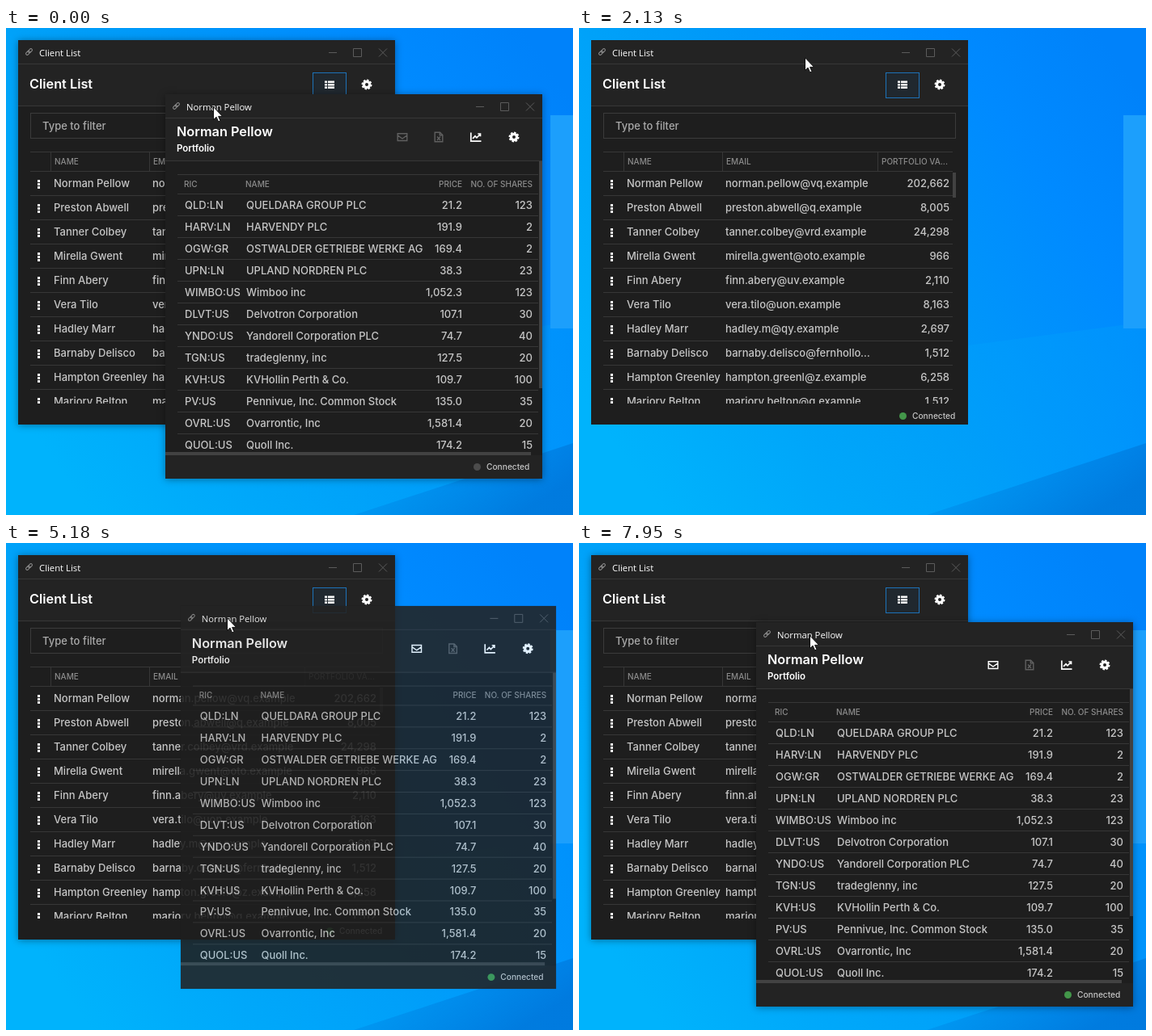
Animation of 701x603 px, one loop 8.48 s. Source, as an HTML page:

```html
<!DOCTYPE html>
<html lang="en">
<head>
<meta charset="utf-8">
<title>Window tabbing</title>
<style>
html, body { margin: 0; width: 100%; height: 100%; overflow: hidden; background: #009cf8; }
#stage { position: relative; width: 701px; height: 603px; overflow: hidden; font: 500 13px Inter, sans-serif; color: #c6c6c6; white-space: nowrap; }
#stage * { box-sizing: border-box; }
#stage > *, .abs { position: absolute; }
.window { left: 0; top: 0; width: 466px; height: 476px; background: #1e1e1e; overflow: hidden; }
.shadow { box-shadow: 0 1px 9px rgba(0, 0, 0, .38); }
.bar, .header { left: 0; width: 466px; background: #232323; border-bottom: 1px solid #373737; }
.bar { top: 0; height: 30px; }
.header { top: 30px; }
.caption { font: 400 11.3px/20px "Open Sans", sans-serif; color: #fff; }
.heading { font-size: 16.3px; font-weight: 600; line-height: 20px; color: #fff; }
.small { font-size: 11.5px; font-weight: 600; line-height: 14px; color: #fff; }
.head { left: 15px; height: 25px; border: solid #373737; border-width: 1px 0; font-size: 10px; line-height: 23px; color: #8c8c8c; }
.rows { left: 15px; overflow: hidden; }
.row { position: relative; border-bottom: 1px solid #373737; }
.icon { width: 16px; height: 16px; overflow: visible; color: #fff; }
.dim { color: #606060; }
.link { color: #929292; }
.status { font-size: 10.2px; line-height: 14px; }
.dot { width: 9px; height: 9px; border-radius: 50%; background: #43974a; }
.line { background: #373737; }
.thumb { background: #424242; }
.tabs { display: none; left: 0; top: 0; width: 466px; height: 30px; }
.tabbed .tabs { display: block; }
.tabbed .plain { display: none; }
.tab { top: 0; width: 160px; height: 30px; border-right: 1px solid #383838; }
.tab.active { background: #262626; border-bottom: 3px solid #1784d8; }
.tab .caption { color: #858585; }
.tab.active .caption { color: #fff; font-weight: 600; }
#cursor { left: -1px; top: -1px; }
</style>
</head>
<body>
<div id="stage">
  <svg width="701" height="603">
    <defs>
      <linearGradient id="sky" x1="0" y1=".75" x2="1" y2=".15">
        <stop offset="0" stop-color="#00b3fc"/><stop offset=".45" stop-color="#009cf8"/>
        <stop offset=".8" stop-color="#008aff"/><stop offset="1" stop-color="#0082fa"/>
      </linearGradient>
      <linearGradient id="beam" x1="0" x2="1">
        <stop offset="0" stop-color="#00b4ff" stop-opacity="0"/><stop offset="1" stop-color="#0096fa" stop-opacity=".6"/>
      </linearGradient>
      <linearGradient id="dusk" x1="0" x2="1" y2=".5">
        <stop offset="0" stop-color="#0084e4" stop-opacity="0"/><stop offset="1" stop-color="#0074d8" stop-opacity=".8"/>
      </linearGradient>
      <symbol id="link" viewBox="0 0 16 16"><g fill="none" stroke="currentColor" stroke-width="1.2" transform="rotate(-45 8 8)">
        <rect x="2" y="6" width="7" height="4" rx="2"/><rect x="7" y="6" width="7" height="4" rx="2"/></g></symbol>
      <symbol id="gear" viewBox="0 0 16 16"><g fill="none" stroke="currentColor">
        <circle cx="8" cy="8" r="3.6" stroke-width="3.2"/><circle cx="8" cy="8" r="5.5" stroke-width="2" pathLength="32" stroke-dasharray="2.4 1.6"/></g></symbol>
      <symbol id="list" viewBox="0 0 16 16"><path fill="currentColor" d="M2 3.5h3v2.5H2zm4 0h8v2.5H6zM2 7h3v2.5H2zm4 0h8v2.5H6zM2 10.5h3V13H2zm4 0h8V13H6z"/></symbol>
      <symbol id="mail" viewBox="0 0 16 16"><path fill="none" stroke="currentColor" stroke-width="1.4" d="M2.2 3.7h11.6v8.8H2.2zM2.4 6.2 8 10l5.6-3.8"/></symbol>
      <symbol id="sheet" viewBox="0 0 16 16"><path fill="none" stroke="currentColor" stroke-width="1.4" d="M3.2 2.2h6.3l3.3 3.3v8.3H3.2zM9.3 2.4v3.3h3.3M6 7.5l4 4.5m0-4.5L6 12"/></symbol>
      <symbol id="chart" viewBox="0 0 16 16"><path fill="none" stroke="currentColor" stroke-width="1.7" d="M1.8 2.5v10.7h12.7M4 9.8l3-3 2 2 4.3-4.3M10.3 4h3.2v3.2"/></symbol>
      <symbol id="controls" viewBox="0 0 76 16"><path fill="none" stroke="#5b5b5b" d="M3 8.5h10M33.5 3.5h10v10h-10zM65 3.5l10 10m0-10-10 10"/></symbol>
    </defs>
    <path fill="url(#sky)" d="M0 0h701v603H0z"/>
    <path fill="url(#beam)" d="M300 417 701 364v239H300z"/>
    <path fill="url(#dusk)" d="M430 603 701 514v89z"/>
    <path fill="#1c9ffc" d="M673 108h264v264H673z"/>
  </svg>
  <div id="client" class="window"></div>
  <div id="portfolio" class="window"></div>
  <svg id="cursor" width="13" height="20">
    <path fill="#fff" stroke="#111" d="M.5.8v15.8l3.6-3.4 2.5 5.7 2.4-1-2.4-5.5h5z"/>
  </svg>
</div>
<script>
const LOOP = 8480;
const $ = id => document.getElementById(id);
const OWNER = 'Norman Pellow';

const clients = [
  [OWNER, 'norman.pellow@vq.example', '202,662'],
  ['Preston Abwell', 'preston.abwell@q.example', '8,005'],
  ['Tanner Colbey', 'tanner.colbey@vrd.example', '24,298'],
  ['Mirella Gwent', 'mirella.gwent@oto.example', '966'],
  ['Finn Abery', 'finn.abery@uv.example', '2,110'],
  ['Vera Tilo', 'vera.tilo@uon.example', '8,163'],
  ['Hadley Marr', 'hadley.m@qy.example', '2,697'],
  ['Barnaby Delisco', 'barnaby.delisco@fernhollow.example', '1,512'],
  ['Hampton Greenley', 'hampton.greenl@z.example', '6,258'],
  ['Marjory Belton', 'marjory.belton@q.example', '1,512']
];
const holdings = [
  ['QLD:LN', 'QUELDARA GROUP PLC', '21.2', 123],
  ['HARV:LN', 'HARVENDY PLC', '191.9', 2],
  ['OGW:GR', 'OSTWALDER GETRIEBE WERKE AG', '169.4', 2],
  ['UPN:LN', 'UPLAND NORDREN PLC', '38.3', 23],
  ['WIMBO:US', 'Wimboo inc', '1,052.3', 123],
  ['DLVT:US', 'Delvotron Corporation', '107.1', 30],
  ['YNDO:US', 'Yandorell Corporation PLC', '74.7', 40],
  ['TGN:US', 'tradeglenny, inc', '127.5', 20],
  ['KVH:US', 'KVHollin Perth & Co.', '109.7', 100],
  ['PV:US', 'Pennivue, Inc. Common Stock', '135.0', 35],
  ['OVRL:US', 'Ovarrontic, Inc', '1,581.4', 20],
  ['QUOL:US', 'Quoll Inc.', '174.2', 15]
];

const esc = s => String(s).replace('&', '&amp;');
const box = (x, y, w, h, cls, style = '') =>
  `<div class="abs ${cls}" style="left:${x}px;top:${y}px;width:${w}px;height:${h}px;${style}"></div>`;
const text = (x, y, s, cls = '', style = '') =>
  `<span class="abs ${cls}" style="left:${x}px;top:${y}px;${style}">${esc(s)}</span>`;
const cell = (x, s, style = '') => text(x, 0, s, '', style);
// Right-aligned cell whose right edge sits at x inside a table of width w
const num = (x, w, s) => `<span class="abs" style="right:${w - x}px;top:0">${s}</span>`;
// Icon centred on x, y
const icon = (name, x, y, cls = '', size = 16) =>
  `<svg class="abs icon ${cls}" style="left:${x - size / 2}px;top:${y - size / 2}px;width:${size}px;height:${size}px"><use href="#${name}"/></svg>`;
const controls = `<svg class="abs" style="left:381px;top:7px" width="76" height="16"><use href="#controls"/></svg>`;
const caption = (s, x = 26) => icon('link', x - 12.5, 14.5, 'link', 13) + text(x, 6, s, 'caption');
const status = y => box(381, y - 4, 9, 9, 'dot') + text(397, y - 7, 'Connected', 'status');
const tab = (x, s, cls) => `<div class="abs tab ${cls}" style="left:${x}px">${caption(s, 29)}${text(141, 6, '×', 'caption')}</div>`;

function clientHTML() {
  const rows = clients.map(([name, mail, value]) => `<div class="row" style="height:30px;line-height:29px">
    ${[0, 4, 8].map(y => box(9, 9.5 + y, 3, 3, '', 'background:#fff')).join('')}
    ${cell(29, name)}${cell(151, mail, 'width:185px;overflow:hidden;text-overflow:ellipsis')}${num(428, 432, value)}</div>`).join('');
  return `<div class="abs bar">${caption('Client List')}${controls}</div>
    <div class="abs header" style="height:52px"></div>
    ${text(14, 44, 'Client List', 'heading')}
    ${box(364, 40, 42, 32, '', 'background:#20282f;border:1px solid #1d72b8')}
    ${icon('list', 385, 55)}${icon('gear', 431, 55)}
    ${box(15, 90, 436, 32, '', 'border:1px solid #3b3b3b')}
    ${text(30, 98, 'Type to filter', '', 'line-height:16px;color:#aaa')}
    <div class="abs head" style="top:138px;width:432px">
      ${cell(30, 'NAME')}${cell(152, 'EMAIL')}${cell(344, 'PORTFOLIO VA...')}
      ${[25, 147, 339].map(x => box(x, 0, 1, 23, 'line')).join('')}</div>
    <div class="abs rows" style="top:163px;width:432px;height:287px">${rows}</div>
    ${box(447, 164, 4, 31, 'thumb')}${status(465)}`;
}

function portfolioHTML() {
  const rows = holdings.map(([ric, name, price, shares]) => `<div class="row" style="height:27px;line-height:26px">
    ${cell(9, ric)}${cell(85, name)}${num(352, 446, price)}${num(439, 446, shares)}</div>`).join('');
  return `<div class="abs bar"><div class="plain">${caption(OWNER)}</div>
      <div class="abs tabs">${tab(0, 'Client List', '')}${tab(160, OWNER, 'active')}</div>${controls}</div>
    <div class="abs header" style="height:53px"></div>
    ${text(14, 36, OWNER, 'heading')}${text(14, 60, 'Portfolio', 'small')}
    ${icon('mail', 293, 53, 'mail')}${icon('sheet', 338, 53, 'dim')}${icon('chart', 384, 53)}${icon('gear', 431, 53)}
    <div class="abs head" style="top:99px;width:446px">
      ${cell(8, 'RIC')}${cell(84, 'NAME')}${num(352, 446, 'PRICE')}${num(439, 446, 'NO. OF SHARES')}</div>
    <div class="abs rows" style="top:124px;width:446px;height:319px">${rows}</div>
    ${box(462, 83, 4, 281, 'thumb')}
    ${box(0, 447, 466, 29, '', 'background:#232323')}${box(0, 443, 452, 4, 'thumb')}${status(461)}`;
}

// time, x, y of the pointer
const pointer = [
  [0, 257, 98], [820, 374, 98], [950, 374, 98], [1510, 290, 51], [1860, 280, 37], [2130, 280, 37],
  [2550, 276, 40], [2950, 276, 40], [3300, 268, 45], [3500, 258, 53], [3720, 241, 30], [3850, 241, 30],
  [4300, 300, 24], [4760, 262, 58], [5180, 274, 93], [5390, 283, 101], [5650, 283, 101], [5990, 279, 101],
  [6540, 277, 114], [6610, 278, 114], [7810, 278, 114], [7950, 286, 115]
];
// time, opacity, scale while the torn-off window opens
const opening = [[5040, 0, .95], [5110, .5, .98], [5180, .88, .996], [5250, 1, 1]];

function sample(keys, t) {
  const next = keys.findIndex(k => k[0] > t);
  if (next === 0) return keys[0].slice(1);
  if (next < 0) return keys[keys.length - 1].slice(1);
  const a = keys[next - 1], b = keys[next], p = (t - a[0]) / (b[0] - a[0]);
  return a.slice(1).map((v, i) => v + (b[i + 1] - v) * p);
}
const pointerAt = t => sample(pointer, t).map(Math.round);
const place = (el, x, y, scale = 1) => { el.style.transform = `translate(${x}px,${y}px) scale(${scale})`; };

const client = $('client'), portfolio = $('portfolio'), cursor = $('cursor');
client.innerHTML = clientHTML();
portfolio.innerHTML = portfolioHTML();
place(client, 15, 15);
const mail = portfolio.querySelector('.mail'), dot = portfolio.querySelector('.dot');

function render(t) {
  const joining = t >= 2130 && t < 2270;
  const docked = t >= 2270 && t < 4830;
  const floating = t < 2130 || t >= 5040;
  let x = 15, y = 15, opacity = 1, scale = 1;
  if (floating) {
    const early = t < 2130;
    const [px, py] = pointerAt(early ? Math.max(t, 950) : Math.min(t, 6700));
    x = px - (early ? 177 : 59);
    y = py - 16;
    if (!early) [opacity, scale] = sample(opening, t);
  }
  place(portfolio, x, y, scale);
  portfolio.style.opacity = opacity;
  portfolio.style.display = docked || floating ? '' : 'none';
  portfolio.classList.toggle('tabbed', docked);
  portfolio.classList.toggle('shadow', t < 1020 || t >= 6940);
  client.classList.toggle('shadow', !joining);
  mail.classList.toggle('dim', t < 400);
  dot.style.background = t < 1090 ? '#4c4c4c' : '#43974a';
  place(cursor, ...pointerAt(t));
}

function tick() {
  render(performance.now() % LOOP);
  requestAnimationFrame(tick);
}
tick();
</script>
</body>
</html>
```
